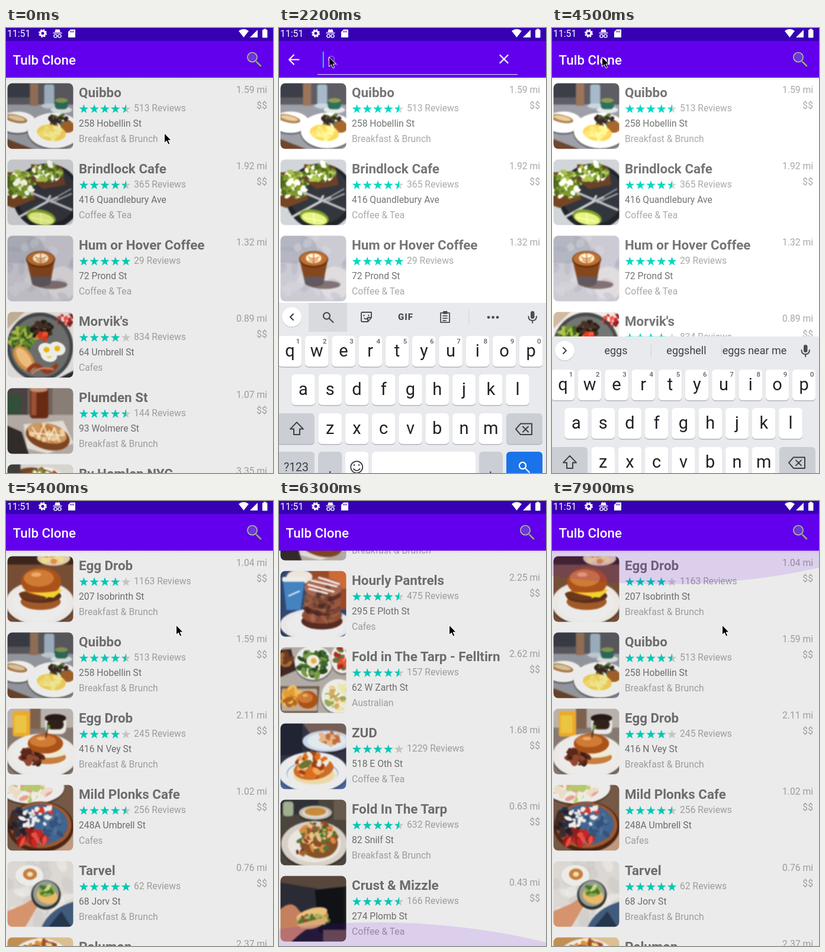
An HTML page that plays this animation: 451x753 px, repeating every 8000 ms.

```html
<!DOCTYPE html>
<html lang="en">
<head>
<meta charset="utf-8">
<title>Restaurant search</title>
<style>
html, body { margin: 0; width: 100%; height: 100%; overflow: hidden; background: #ebebeb; }
svg { display: block; width: 451px; height: 753px; font-family: Roboto, sans-serif; }
</style>
</head>
<body>
<svg id="stage" viewBox="0 0 451 753" xmlns="http://www.w3.org/2000/svg"></svg>
<script>
const LOOP = 8000, PITCH = 129, TOP = 93, END = 1910;
const TEAL = '#00d9c3', INK = '#3c4043';

// Drawing helpers
const oval = (x, y, rx, ry, fill, turn = 0) =>
  `<ellipse cx="${x}" cy="${y}" rx="${rx}" ry="${ry}" fill="${fill}" transform="rotate(${turn} ${x} ${y})"/>`;
const box = (x, y, w, h, fill, r = 0) =>
  `<rect x="${x}" y="${y}" width="${w}" height="${h}" rx="${r}" fill="${fill}"/>`;
const shape = (d, fill) => `<path d="${d}" fill="${fill}"/>`;
const line = (d, color, w = 2) =>
  `<path d="${d}" fill="none" stroke="${color}" stroke-width="${w}" stroke-linecap="round" stroke-linejoin="round"/>`;
const text = (x, y, size, fill, str, more = '') =>
  `<text x="${x}" y="${y}" font-size="${size}" fill="${fill}" ${more}>${str.replace(/&/g, '&amp;')}</text>`;
const group = (id, body, more = '') => `<g id="${id}" ${more}>${body}</g>`;
const MID = 'text-anchor="middle"', RIGHT = 'text-anchor="end"';

function bits(n, x, y, rx, ry, size, colors) {
  let seed = n * 97 + x * 13 + y * 7, out = '';
  const rnd = () => (seed = (seed * 16807 + 11) % 2147483647) / 2147483647;
  rnd(); rnd();
  for (let i = 0; i < n; i++) {
    const a = rnd() * 6.28, d = Math.sqrt(rnd());
    out += oval((x + rx * d * Math.cos(a)).toFixed(1), (y + ry * d * Math.sin(a)).toFixed(1),
      size * (1 + rnd()), size * (.6 + rnd() * .6), colors[i % colors.length], Math.round(rnd() * 180));
  }
  return out;
}
const bg = fill => box(-6, -6, 124, 124, fill);
const plate = (x, y, rx, ry, fill = '#e6e3e0') =>
  oval(x, y + 2, rx + 1, ry + 1, '#00000055') + oval(x, y, rx, ry, fill) + oval(x, y, rx * .8, ry * .8, '#ffffff55');
const bun = (x, y, rx, ry) =>
  oval(x, y, rx, ry, '#a3531f') + oval(x - 4, y - ry * .25, rx * .75, ry * .6, '#c4783a') +
  oval(x - rx * .25, y - ry * .5, rx * .25, ry * .16, '#e3a567');
const egg = (x, y) => oval(x, y, 14, 11, '#f5f0e8', 20) + oval(x, y, 5.5, 5, '#f0a91f');

const photos = {
  plates: bg('#8c8e95') + box(-6, -6, 124, 42, '#57565b') + box(-6, -6, 44, 30, '#3b3d45') +
    box(38, 0, 14, 38, '#8a6a55') + box(62, 2, 17, 42, '#93a4b2', 4) + oval(70, 38, 13, 4, '#b4bcc4') +
    shape('M-6 92L60 118H-6Z', '#65432f') + oval(91, 45, 18, 6, '#c9ccce') + box(80, 27, 22, 17, '#2f6655', 6) +
    oval(91, 29, 11, 4, '#7d8c50') + plate(17, 66, 31, 18) + oval(14, 60, 20, 7, '#9a774f', 12) +
    oval(15, 59, 15, 4, '#cdb590', 12) + plate(79, 80, 45, 30) + bits(34, 88, 63, 20, 10, 3, ['#2f3a22', '#40242e', '#5b6a33']) +
    oval(102, 74, 12, 10, '#965f2e') + oval(74, 84, 25, 14, '#e8bd5a', 8) + bits(20, 74, 83, 20, 10, 4, ['#f5d98a', '#eecb6e']),
  avocado: bg('#b9bbbe') + oval(67, 63, 58, 56, '#25272c') + oval(67, 61, 51, 48, '#34363c') +
    shape('M-6 22L34 20L47 67L10 82L-6 76Z', '#6a4327') + bits(65, 20, 45, 24, 24, 4, ['#71882f', '#93a947', '#4b6424', '#e9ecdb']) +
    shape('M40 8L92 12L98 43L60 50L40 34Z', '#61402a') + bits(50, 66, 22, 27, 15, 3.5, ['#71882f', '#9bb04c', '#4b6424', '#eff0e5']) +
    line('M20 97L66 72L72 62M66 72L84 64', '#b5b7bb', 4) + line('M72 70L107 50M74 73L108 58', '#9da0a6', 2) +
    line('M40 56L108 85', '#a7a9ad', 4) + oval(57, 98, 25, 13, '#718e2c', 12) + oval(57, 100, 22, 10, '#c9d476', 12) +
    line('M40 98L72 105M56 91L57 109', '#e9edbd', 1),
  coffee: bg('#b3b2b9') + oval(20, 22, 42, 25, '#9fa1aa') + oval(92, 80, 26, 28, '#c4c1c3') + bits(28, 55, 60, 62, 60, 7, ['#c7c5ca55', '#8e90a144']) +
    oval(75, 83, 26, 7, '#75686a') + shape('M32 40L80 40L72 82Q56 91 42 82Z', '#794421') + shape('M39 69H75L72 82Q56 90 42 82Z', '#5a5358') +
    oval(56, 40, 24.5, 14, '#5d2f14') + oval(56, 39, 23, 12, '#a76732') + oval(56, 38, 13, 8, '#efdcc2') +
    line('M47 36Q56 43 65 36M56 31V47M49 41Q56 46 63 41', '#a76732', 1.8),
  brunch: bg('#d2cecb') + shape('M-6 -6H35L-6 34Z', '#b6a58f') + oval(55, 59, 56, 58, '#454849') + oval(55, 59, 50, 52, '#696b68') +
    bits(60, 26, 43, 24, 20, 4, ['#668234', '#9aac45', '#3d5924']) + bits(36, 58, 28, 18, 13, 4, ['#26201c', '#463228']) +
    bits(7, 60, 41, 12, 5, 4, ['#c73a23', '#e45432']) + egg(70, 73) + egg(84, 62) + egg(66, 64) +
    oval(28, 79, 14, 25, '#c58b49', -35) + oval(28, 78, 9, 20, '#e0b37b', -35) +
    line('M36 98Q47 83 58 96T82 91', '#8f3c25', 7) + line('M42 104Q55 91 77 97', '#c9805d', 3) +
    bits(30, 98, 13, 15, 12, 2, ['#b52025', '#db4038', '#6d2525']) + shape('M75 118L118 96V118Z', '#2e3036'),
  iced: bg('#6d635d') + box(-6, -6, 40, 64, '#4b4643') + box(76, -6, 44, 55, '#857b73') + box(0, 12, 22, 32, '#35513c', 3) +
    box(-6, 45, 130, 75, '#aaa19c') + shape('M-6 61L24 74L38 118H-6Z', '#35302f') + box(38, -3, 31, 54, '#682f1a', 5) +
    box(40, 4, 9, 42, '#945239') + oval(53, 2, 15, 5, '#b88870') + shape('M27 61L94 55L112 93L68 111L33 102Z', '#d5cfc8') +
    oval(68, 82, 38, 22, '#7b4826', 15) + oval(67, 76, 34, 16, '#c2935f', 15) + bits(18, 66, 75, 27, 12, 4, ['#e2c29b', '#b5783f']) +
    line('M42 66L53 83L61 62L70 88L79 67L88 90M43 76L93 80', '#f0dfc6', 2),
  toast: bg('#cbc8c4') + plate(57, 44, 50, 40) + oval(50, 20, 35, 14, '#6e492c', 8) + bits(35, 60, 28, 28, 19, 4, ['#718c3c', '#e8dfc2', '#9b4d2a']) + box(-6, -6, 28, 24, '#43403e'),
  eggBun: bg('#735039') + box(-6, -6, 124, 20, '#3f2a21') + oval(78, 3, 28, 13, '#d5c0a1') + bits(18, 76, 2, 22, 8, 4, ['#d28a45', '#e6d28b']) +
    plate(55, 79, 58, 37, '#dfdad6') + oval(56, 77, 34, 14, '#9b5a2c') + oval(56, 67, 35, 12, '#593321') +
    shape('M24 60L64 72L91 57L76 52Z', '#efbe29') + oval(42, 67, 23, 7, '#6a3c22', 8) + bun(57, 43, 34, 24) +
    shape('M28 59Q55 65 93 57L78 70L62 68Z', '#f5c934'),
  juice: bg('#81766f') + box(-6, -6, 124, 38, '#b0aaa5') + box(38, -6, 18, 40, '#7a604f') + box(9, 4, 29, 43, '#e5a12e', 4) + box(12, 11, 20, 30, '#f3ba46') +
    box(64, 12, 35, 31, '#dedbd8', 9) + oval(81, 16, 18, 7, '#2a201d') + box(67, 18, 28, 17, '#33261f', 8) +
    plate(58, 80, 60, 38, '#e0dcd8') + oval(67, 82, 32, 12, '#bd7b42') + oval(68, 74, 31, 9, '#efe2cc') +
    bits(24, 43, 80, 18, 13, 5, ['#5c2d20', '#8b4932', '#3d221b']) + bun(64, 59, 30, 17) + line('M68 30L65 48', '#3c3427', 2) + oval(69, 31, 3, 4, '#719044'),
  bowl: bg('#735a48') + shape('M66 118L118 72V118Z', '#b5947b') + plate(41, 4, 55, 28) + bits(60, 36, 4, 40, 19, 5, ['#ead0bf', '#d7988d', '#f1e8de', '#aac069']) +
    oval(56, 71, 56, 43, '#4b2a1b') + oval(56, 68, 52, 39, '#995936') + oval(56, 67, 46, 34, '#43648b') + bits(28, 76, 70, 24, 21, 4, ['#526f95', '#385377']) +
    bits(55, 24, 64, 19, 25, 4, ['#28242c', '#4b3126', '#303244']) + bits(28, 46, 56, 25, 16, 3, ['#f0e9e2', '#dbdce0']) +
    bits(26, 40, 91, 25, 12, 5, ['#bb2b29', '#dc5145', '#8d241f']) + bits(12, 60, 42, 20, 6, 4, ['#c23d34', '#ece7df']),
  marble: bg('#cfccc8') + bits(22, 55, 48, 60, 60, 9, ['#e3e1dd88', '#b7b4b355']) + oval(37, 24, 23, 17, '#e9e6e1') + oval(38, 22, 15, 13, '#f2ece3') +
    oval(38, 22, 12, 10, '#b97c43') + oval(38, 22, 5, 4, '#eed7b0') + shape('M55 118Q69 78 118 67V118Z', '#425b78') + shape('M64 118L91 85L112 118Z', '#29384d') +
    shape('M-6 87L30 72L45 62L55 69L48 81L26 118H-6Z', '#c98e6b') + oval(65, 57, 25, 25, '#343532') + oval(65, 55, 22, 22, '#8d9690') +
    oval(67, 59, 18, 13, '#dfb068', 15) + oval(67, 51, 14, 9, '#84a14a', -15) + bits(12, 66, 48, 12, 8, 3, ['#bfce82', '#4d702f']),
  orange: bg('#b78a55') + box(50, -6, 70, 30, '#d0b58c') + plate(56, 34, 47, 32) + bits(44, 57, 25, 35, 17, 4, ['#d18a36', '#9b4f2c', '#e8cb7b']),
  pastry: bg('#34496c') + shape('M48 -6H118V65H73Z', '#944b2d') + box(82, -6, 40, 36, '#c2693a') + oval(32, 10, 22, 12, '#e3d8cc') +
    shape('M4 15L41 15L34 66L10 66Z', '#477fb6') + box(3, 10, 39, 8, '#eee8e0', 3) + line('M14 42L32 34', '#e5edf3', 2) +
    plate(60, 91, 61, 28, '#dcd8dc') + oval(70, 85, 35, 14, '#5a3128') + oval(70, 75, 34, 14, '#894f3b') + oval(70, 64, 31, 12, '#56312a') +
    oval(71, 53, 32, 14, '#925741') + oval(72, 40, 30, 12, '#5c362e') + oval(72, 28, 32, 17, '#9f6651') +
    bits(30, 70, 57, 28, 31, 5, ['#b5785b55', '#3b252666']) + line('M47 23L90 35M52 16L95 26M48 30L79 38M65 11L99 22', '#eee4e0', 3),
  dishes: bg('#aaa49e') + shape('M-6 5L18 3L26 39L-6 53Z', '#422e27') + bits(12, 6, 22, 14, 14, 5, ['#a66938', '#6b4028']) +
    plate(56, 26, 32, 29) + bits(65, 56, 27, 27, 23, 4, ['#426530', '#779349', '#2d4a28']) + oval(55, 23, 11, 10, '#efe8d8') + oval(56, 23, 5, 5, '#d9a24b') +
    plate(105, 19, 20, 25) + bits(24, 104, 19, 15, 20, 4, ['#a42f25', '#d45637', '#60713f']) + shape('M-6 66H66L62 118H-6Z', '#68594e') + box(2, 70, 60, 38, '#b7a594', 3) +
    bits(34, 21, 84, 17, 14, 5, ['#d59736', '#a76525', '#e8b758']) + bun(46, 89, 17, 15) + plate(98, 83, 29, 29) + bits(45, 97, 84, 23, 22, 4, ['#e8d9a7', '#c9a363', '#8fa258', '#f2ead2']),
  pancake: bg('#373747') + box(-6, -6, 43, 60, '#272936') + shape('M34 -6H118V23H54Z', '#725e58') + plate(78, 30, 41, 18, '#bfcadd') + bits(20, 76, 25, 22, 9, 4, ['#b66b41', '#d9ae83']) +
    box(-6, 79, 124, 40, '#4a689c') + plate(55, 82, 59, 34, '#dee2e8') + oval(54, 85, 44, 22, '#6881ad') + oval(54, 86, 43, 22, '#dfddd9') +
    oval(57, 88, 35, 15, '#e8cca0') + oval(56, 77, 34, 18, '#bd6c2f', -8) + bits(48, 53, 70, 26, 19, 5, ['#cf6d25', '#98431e', '#e8a35a', '#efe5d7']) + oval(42, 69, 12, 6, '#6c7237', -25),
  herbs: bg('#4c4741') + box(-6, -6, 70, 31, '#353438') + box(4, 3, 18, 25, '#98a78a', 5) + plate(59, 22, 28, 12, '#b7b1a8') + oval(59, 20, 18, 7, '#bd873e') +
    box(90, 0, 22, 34, '#675b4e') + plate(57, 75, 56, 39, '#cbc5bc') + oval(65, 74, 32, 25, '#80542c') + bits(70, 64, 62, 31, 25, 4, ['#58713a', '#ce8644', '#dfb780', '#8d4b2b']) +
    bits(20, 66, 49, 20, 12, 2, ['#9db764', '#44602d', '#bd5145']) + bits(6, 34, 92, 12, 5, 3, ['#65312a', '#9c6432']),
  sandwich: bg('#232327') + shape('M-6 -6H118V17L-6 30Z', '#57483f') + shape('M-6 10L65 22L70 55L-6 67Z', '#303039') + shape('M58 24L107 19V104L65 96Z', '#18191d') + box(72, 91, 50, 30, '#645145') +
    shape('M-6 62Q15 39 28 54L37 65L33 81L49 87Q31 98 12 118H-6Z', '#bb7d5d') + oval(54, 73, 28, 16, '#ba8951', -16) + oval(53, 65, 27, 10, '#ddb779', -16) +
    bits(30, 57, 75, 23, 7, 4, ['#526f36', '#9bad59', '#8b4a32']) + shape('M28 82L77 69L81 76Q55 93 33 87Z', '#cda36d')
};

const brunch = 'Breakfast & Brunch', tea = 'Coffee & Tea', cafes = 'Cafes';
const firstRow = ['plates', 'Quibbo', 4.5, 513, '258 Hobellin St', brunch, 1.59];
const nearby = [
  firstRow,
  ['avocado', 'Brindlock Cafe', 4.5, 365, '416 Quandlebury Ave', tea, 1.92],
  ['coffee', 'Hum or Hover Coffee', 5, 29, '72 Prond St', tea, 1.32, ''],
  ['brunch', "Morvik's", 4, 834, '64 Umbrell St', cafes, 0.89],
  ['iced', 'Plumden St', 4.5, 144, '93 Wolmere St', brunch, 1.07],
  ['toast', 'By Homlen NYC', 4.5, 218, '29 Torvane St', brunch, 3.35]
];
const found = [
  ['eggBun', 'Egg Drob', 4, 1163, '207 Isobrinth St', brunch, 1.04],
  firstRow,
  ['juice', 'Egg Drob', 4, 245, '416 N Vey St', brunch, 2.11],
  ['bowl', 'Mild Plonks Cafe', 4.5, 256, '248A Umbrell St', cafes, 1.02],
  ['marble', 'Tarvel', 5, 62, '68 Jorv St', brunch, 0.76],
  ['orange', 'Pelumon', 4.5, 187, '94 Drulby St', brunch, 2.37],
  ...nearby.slice(1), ...nearby.slice(1, 5),
  ['pastry', 'Hourly Pantrels', 4.5, 475, '295 E Ploth St', cafes, 2.25],
  ['dishes', 'Fold in The Tarp - Felltirn', 4.5, 157, '62 W Zarth St', 'Australian', 2.62],
  ['pancake', 'ZUD', 4, 1229, '518 E Oth St', tea, 1.68],
  ['herbs', 'Fold In The Tarp', 4.5, 632, '82 Snilf St', brunch, 0.63],
  ['sandwich', 'Crust & Mizzle', 4.5, 166, '274 Plomb St', tea, 0.43]
];

function star(x, y, fill) {
  let d = '';
  for (let i = 0; i < 10; i++) {
    const r = i % 2 ? 3.3 : 8.2, a = i * Math.PI / 5;
    d += `${i ? 'L' : 'M'}${(x + r * Math.sin(a)).toFixed(1)} ${(y - r * Math.cos(a)).toFixed(1)}`;
  }
  return shape(d + 'Z', fill);
}

function row([photo, name, rating, reviews, street, kind, miles, price = '$$'], i) {
  const dark = '#757575', pale = '#a9a9a9';
  let s = `<g transform="translate(2.5 .5)" clip-path="url(#thumb)"><g filter="url(#soft)">${photos[photo]}</g></g>`;
  for (let k = 0; k < 5; k++) {
    const part = rating - k;
    s += star(131.4 + 17.8 * k, 44.2, part >= 1 ? TEAL : part > 0 ? 'url(#half)' : '#d5d5d5');
  }
  s += text(123, 24, 22.4, dark, name, 'font-weight="700"') +
    text(216, 48, 15.7, pale, reviews + ' Reviews') +
    text(123, 74, 15.7, dark, street) + text(123, 100, 15.7, pale, kind) +
    text(441, 17, 15.7, pale, miles.toFixed(2) + ' mi', RIGHT) + text(441, 43, 15.7, pale, price, RIGHT);
  return `<g transform="translate(0 ${TOP + PITCH * i})">${s}</g>`;
}

const lens = (x, y, r, color, w) =>
  `<circle cx="${x}" cy="${y}" r="${r}" fill="none" stroke="${color}" stroke-width="${w}"/>` +
  line(`M${x + r * .75} ${y + r * .75}L${x + r * 2} ${y + r * 2}`, color, w);

const statusBar = box(0, 0, 451, 22, '#3700b3') + text(2, 15, 15.8, '#fff', '11:51') +
  '<circle cx="62" cy="9" r="4" fill="none" stroke="#fff" stroke-width="3"/>' +
  '<circle cx="62" cy="9" r="6" fill="none" stroke="#fff" stroke-width="2" stroke-dasharray="2.7 2"/>' +
  shape('M82 7L84 2Q87 3.500 90 2L92 7Z', '#fff') + line('M80 8.500H94', '#fff', 1.4) +
  '<g fill="none" stroke="#fff" stroke-width="1.4"><circle cx="83.500" cy="13.500" r="2.600"/><circle cx="90.500" cy="13.500" r="2.600"/></g>' +
  shape('M109 2.500H117V16H105V6.500Z', '#fff') + line('M109 5V7M111.500 5V7M114 5V7', '#3700b3', 1.2) +
  shape('M401.500 16L393 5Q401.500 -1.500 410 5Z', '#fff') + shape('M412 16H425V3Z', '#fff') +
  box(433, 3, 8.5, 13.5, '#fff', 1) + box(435, 1.5, 4.5, 3, '#fff');

const titleBar = text(11.5, 62, 22.3, '#fff', 'Tulb Clone', 'font-weight="500"') +
  line('M422.500 56.500L430 64', '#4a3f63', 4.4) + line('M423 57L430 64', '#aaa5b4', 2.2) +
  '<circle cx="416" cy="49.500" r="8" fill="#6f35de" stroke="#4b3a7c" stroke-width="2.800"/>' +
  '<circle cx="416" cy="49.500" r="8" fill="none" stroke="#bdb7c9" stroke-width="1.600"/>';

const searchBar = line('M33.500 53.500H17M25 45.500L17 53.500L25 61.500', '#fff', 2.1) +
  line('M373.500 46L386.500 59M386.500 46L373.500 59', '#fff', 2.3) + box(65, 78, 338, 1.2, '#d9c6fb') +
  group('hint', lens(88.5, 52.5, 5, '#fff', 1.6), 'opacity=".32"') +
  text(73.5, 61, 20, '#fff', '', 'id="query"') + '<rect id="caret" y="40" width="2.200" height="27" fill="#03dac5"/>';

// Keyboard
const key = (x, y, w, fill = '#fff') => box(x, y + 1.5, w, 52, '#b3b6bb', 6) + box(x, y, w, 52, fill, 6);
const letters = (str, x0, y, digits) => [...str].map((c, i) => {
  const x = x0 + 45.25 * i;
  return key(x - 19.8, y, 39.6) + text(x, y + 35, 29, '#202124', c, MID) +
    (digits ? text(x + 13.5, y + 12.5, 11.5, '#5f6368', String((i + 1) % 10), MID + ' font-weight="500"') : '');
}).join('');
const GREY = '#cbced5';
const toolStrip = box(50, 441, 65, 49, '#d8dade') + lens(80.5, 463, 5.5, '#4a4d51', 2.2) +
  line('M141 457H156V466L150 473H141Q139 473 139 471V459Q139 457 141 457M150 473V466H156M143.500 462V463M151.500 462V463M144 467Q147 470 149 467', '#4a4d51', 1.9) +
  text(214, 470, 15, '#4a4d51', 'GIF', MID + ' font-weight="900" letter-spacing="1"') +
  line('M273 458H288V474H273ZM277 463H284M277 467H284M277 471H282', '#4a4d51', 1.8) + box(277, 455, 7.5, 5, '#4a4d51', 1) +
  box(320.5, 453, 1, 25, '#cdd0d4') + [354, 361.5, 369].map(x => oval(x, 465.5, 2.4, 2.4, '#4a4d51')).join('');
const words = [108, 227, 342].map((x, i) => text(x, 471, 18, INK, '', `${MID} id="word${i}"`)).join('') +
  box(167, 455, 1, 21, '#cdd0d4') + box(286, 455, 1, 21, '#cdd0d4');
const keyboard = box(0, 441, 451, 330, '#e8eaee') + group('tools', toolStrip) + group('words', words) +
  oval(21.5, 466, 16.8, 16.8, '#c6c8cc') + oval(21.5, 465, 16.5, 16.5, '#fff') +
  group('chevron', line('M24 460L19 465L24 470', '#34373b', 2)) +
  box(425, 455, 6.5, 13, '#4a4d51', 3.2) + line('M421.500 464Q421.500 471 428.200 471T435 464M428.200 471V475', '#4a4d51', 2) +
  letters('qwertyuiop', 18.5, 497, true) + letters('asdfghjkl', 41, 562) + letters('zxcvbnm', 86.2, 628) +
  key(-4, 628, 64, GREY) + line('M30 643L19 654.500H25V664H35V654.500H41Z', INK, 2) +
  key(384, 628, 61, GREY) + line('M408 645.500H427V664H408L400 654.700ZM412 650.500L421 659.500M421 650.500L412 659.500', INK, 2) +
  key(-4, 693, 64, GREY) + text(29, 726, 19.5, INK, '?123', MID) + key(66.500, 693, 39.6, GREY) + text(86, 729, 24, INK, ',', MID) +
  key(111.500, 693, 39.6) + line('M126 722Q131 728 136.500 722M127 715V716M135 715V716', INK, 2) +
  `<circle cx="131.200" cy="719" r="10" fill="none" stroke="${INK}" stroke-width="1.800"/>` +
  key(157, 693, 175) + key(338, 693, 39.6, GREY) + text(357.5, 729, 24, INK, '.', MID) +
  key(384, 693, 61, '#1a73e8') + lens(411.5, 716.5, 5.6, '#fff', 2.2);

// The photo filter softens edges and lifts brightness and contrast
const stage = document.getElementById('stage');
const lift = ['R', 'G', 'B'].map(c => `<feFunc${c} type="linear" slope="1.2" intercept="-.04"/>`).join('');
stage.innerHTML = `<defs>
  <clipPath id="thumb"><rect width="111" height="111" rx="8"/></clipPath>
  <clipPath id="body"><rect y="84" width="451" height="669"/></clipPath>
  <filter id="soft" x="-10%" y="-10%" width="120%" height="120%" color-interpolation-filters="sRGB">
    <feGaussianBlur stdDeviation=".8"/><feComponentTransfer>${lift}</feComponentTransfer>
  </filter>
  <linearGradient id="half"><stop offset=".5" stop-color="${TEAL}"/><stop offset=".5" stop-color="#d5d5d5"/></linearGradient>
  <linearGradient id="shade" x2="0" y2="1"><stop stop-opacity=".1"/><stop offset="1" stop-opacity="0"/></linearGradient>
</defs>` + box(0, 0, 451, 753, '#fff') +
  group('list', group('nearby', nearby.map(row).join('')) + group('found', found.map(row).join('')), 'clip-path="url(#body)"') +
  '<rect id="dim" y="84" width="451" height="669" opacity=".08"/>' +
  '<g clip-path="url(#body)"><ellipse id="glow" rx="676" ry="360" fill="#6200ee"/></g>' +
  group('keyboard', keyboard) + box(0, 84, 451, 4, 'url(#shade)') + box(0, 22, 451, 62, '#6200ee') +
  group('title', titleBar) + group('search', searchBar) + statusBar +
  group('pointer', '<path d="M.5 0V16.500L4.300 12.900L7 19L9.700 17.800L7.100 12H12.100Z" fill="#000" stroke="#fff" stroke-width="1"/>');

const $ = id => document.getElementById(id);
const set = (id, name, value) => $(id).setAttribute(name, value);
const show = (id, on) => set(id, 'display', on ? 'inline' : 'none');
const ramp = (t, from, to) => Math.min(1, Math.max(0, (t - from) / (to - from)));
const ease = u => u * u * (3 - 2 * u);
const out = u => 1 - (1 - u) ** 2;

const moves = [[330, 1100, 420, 49], [1250, 1800, 84, 49], [4930, 5400, 287, 210]];
const typing = [
  [3500, 'e', 83.5, []],
  [3700, 'eg', 94.5, ['eg', 'egg', 'ego']],
  [4000, 'egg', 105.5, ['egg', 'eggs', 'eggplant']],
  [4300, 'eggs', 115.5, ['eggs', 'eggshell', 'eggs near me']]
];

function pointer(t) {
  let x = 267, y = 178;
  for (const [from, to, tx, ty] of moves) {
    const u = ease(ramp(t, from, to));
    x += (tx - x) * u;
    y += (ty - y) * u;
  }
  set('pointer', 'transform', `translate(${x} ${y})`);
}

function search(t) {
  const open = t >= 1300 && t < 4500;
  show('search', open);
  show('title', !open);
  const [, query, caretX, hints] = typing.filter(k => t >= k[0]).pop() || [0, '', 73.8, []];
  $('query').textContent = query;
  show('hint', !query);
  set('caret', 'x', caretX);
  show('caret', t >= 2000 && !(t >= 2800 && t < 3100));
  show('tools', !hints.length);
  show('words', hints.length);
  set('chevron', 'transform', hints.length ? 'rotate(180 21.500 465)' : '');
  hints.forEach((w, i) => $('word' + i).textContent = w);
  const up = out(ramp(t, 1940, 2300)) - ease(ramp(t, 4400, 4700));
  show('keyboard', up > 0);
  set('keyboard', 'transform', `translate(0 ${312 * (1 - up)})`);
  show('dim', t < 2000 || t >= 4600);
}

function list(t) {
  show('nearby', t < 5000);
  show('found', t >= 5000);
  const down = ramp(t, 6070, 6270) ** 1.8, back = ramp(t, 7360, 7820) ** 2.2;
  set('found', 'transform', `translate(0 ${-END * (down - back)})`);
  const low = t < 7000;
  const h = low ? 40 + 22 * out(ramp(t, 6300, 6500)) : 57 * ramp(t, 7750, 7900);
  const fade = low ? 1 - ramp(t, 6350, 6800) : 1;
  show('glow', t >= 6270 && h > 0 && fade > 0);
  set('glow', 'opacity', .12 * fade);
  set('glow', 'cx', low ? 165 : 190);
  set('glow', 'cy', low ? 753 - h + 360 : 84 + h - 360);
}

function render(t) {
  pointer(t);
  search(t);
  list(t);
}

const start = performance.now();
function tick() {
  render(Math.floor((performance.now() - start) % LOOP / 100) * 100);
  requestAnimationFrame(tick);
}
tick();
</script>
</body>
</html>
```
